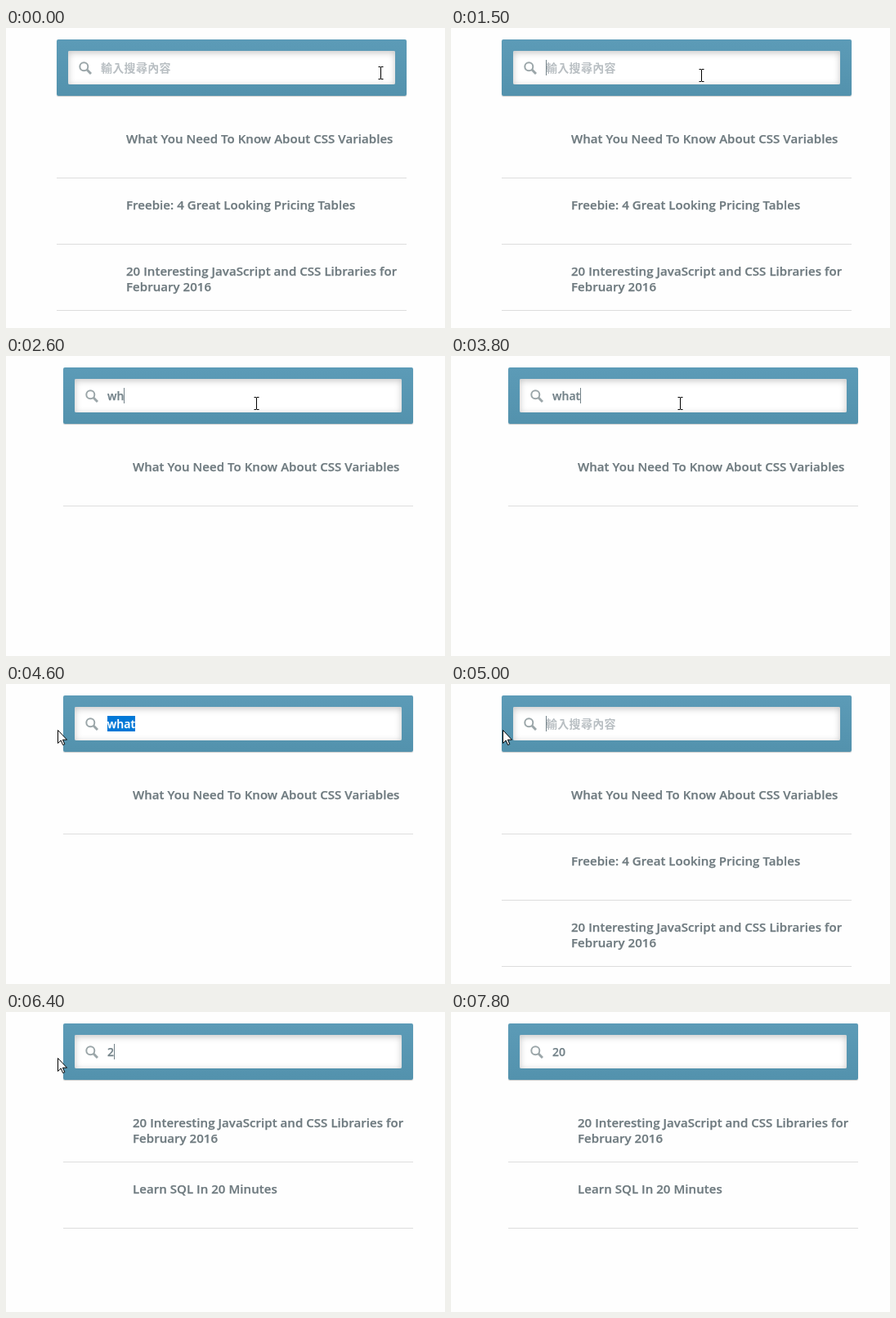
An HTML page that plays this animation: 537 by 367 pixels, repeating every 8.2 s.

```html
<!DOCTYPE html>
<html lang="zh-Hant">
<head>
<meta charset="utf-8">
<title>Instant search</title>
<style>
html, body { margin: 0; width: 100%; height: 100%; overflow: hidden; background: #fefefe; }
body {
  position: relative; font: 600 15px/19px 'Open Sans', sans-serif;
  letter-spacing: .06px; -webkit-text-stroke: .25px;
}
#page { position: absolute; top: 14px; width: 428px; }
.bar {
  height: 41px; padding: 14px; border-radius: 2px;
  background: linear-gradient(#5c9bb7, #5392ad); box-shadow: 0 1px 1px #ccc;
}
.field {
  position: relative; height: 41px; border-radius: 2px; background: #fff;
  box-shadow: 0 2px 8px #c4c4c4 inset; font-size: 14px; color: #738289;
}
.field > * { position: absolute; top: 11px; left: 40px; height: 19px; white-space: pre; }
.field .icon { left: 13px; top: 13px; width: 16px; height: 16px; }
#hint {
  font-family: 'Noto Sans CJK TC', 'Noto Sans CJK', sans-serif; font-weight: 700;
  letter-spacing: .3px; color: #b9bfc3; -webkit-text-stroke: 0;
}
#caret { width: 1px; background: #738289; }
#mark { overflow: hidden; background: #0078d7; color: #fff; }
#mark span { position: absolute; right: 0; }
ul { list-style: none; margin: 20px 0 0; padding: 0; }
li { height: 80px; border-bottom: 1px solid #ddd; }
li p { margin: 0; padding: 23px 0 0 85px; white-space: pre; color: #6e7a7f; }
.cursor { position: absolute; left: 0; top: 0; overflow: visible; width: 1px; height: 1px; }
</style>
</head>
<body>
<div id="page">
  <div class="bar"><div class="field">
    <svg class="icon" viewBox="0 0 16 16" fill="none" stroke="#9ba6a9">
      <circle cx="6.3" cy="6.3" r="5" stroke-width="2"/>
      <path d="M10 10l5 5" stroke-width="3"/>
    </svg>
    <span id="hint">輸入搜尋內容</span>
    <span id="query"></span>
    <span id="mark"><span></span></span>
    <span id="caret"></span>
  </div></div>
  <ul id="list"></ul>
</div>
<svg id="beam" class="cursor" fill="none">
  <path d="M-2.5 -7.5h2.5l.5 .5 .5 -.5h2.5M.5 -7v14M-2.5 7.5h2.5l.5 -.5 .5 .5h2.5" stroke="#000"/>
</svg>
<svg id="arrow" class="cursor">
  <path d="M.5 .5v16l3.7 -3.5 2.4 5.6 2.2 -1 -2.4 -5.4h5.1z" fill="#fff" stroke="#000"/>
</svg>
<script>
const LOOP = 8200, STEP = 100, BLINK = 500;
const titles = [
  'What You Need To Know About CSS Variables',
  'Freebie: 4 Great Looking Pricing Tables',
  '20 Interesting JavaScript and CSS Libraries for\nFebruary 2016',
  'Quick Tip: The Easiest Way To Make\nResponsive Headers',
  'Learn SQL In 20 Minutes',
  'Creating Your First Desktop App With HTML,\nJS and Electron'
];

// Story beats in ms
const FOCUS = 600, DRAG = 4300, CLEAR = 5000, LEAVE = 7800;
const searches = [
  { word: 'what', keys: [1800, 2600, 2700, 3300], end: CLEAR },
  { word: '20', keys: [6400, 6600], end: LOOP }
];
const blinkStarts = [500, 4900, 6400];
const path = [
  { t: 0, x: 458, y: 55 }, { t: 300, x: 306, y: 58 },
  { t: 3700, x: 306, y: 58 }, { t: 4100, x: 200, y: 56 },
  { t: 4200, x: 200, y: 56 }, { t: 4600, x: 63, y: 56 },
  { t: 7100, x: 63, y: 56 }, { t: LEAVE, x: 600, y: 40 }
];

const $ = id => document.getElementById(id);
const show = (el, on) => el.style.visibility = on ? 'visible' : 'hidden';
let shown = null;

function typedAt(t) {
  const { word, keys } = searches.find(search => t < search.end);
  return word.slice(0, keys.filter(key => key <= t).length);
}

function mouseAt(t) {
  const next = path.findIndex(p => p.t > t);
  if (next < 0) return path.at(-1);
  const a = path[next - 1], b = path[next];
  const k = (t - a.t) / (b.t - a.t);
  return { x: Math.round(a.x + (b.x - a.x) * k), y: Math.round(a.y + (b.y - a.y) * k) };
}

function caretAt(t) {
  const start = blinkStarts.findLast(s => s <= t);
  return t >= FOCUS && t < LEAVE && Math.floor((t - start) / BLINK) % 2 === 0;
}

function search(text) {
  if (text === shown) return;
  shown = text;
  $('query').textContent = $('mark').firstChild.textContent = text;
  $('caret').style.left = 40 + Math.round($('query').offsetWidth) + 'px';
  show($('hint'), !text);
  // Short result lists drop the scrollbar, which recentres the page
  $('page').style.left = (text ? 70 : 62) + 'px';
  $('list').replaceChildren(...titles
    .filter(title => title.toLowerCase().includes(text))
    .slice(0, 3)
    .map(title => {
      const item = document.createElement('li');
      item.appendChild(document.createElement('p')).textContent = title;
      return item;
    }));
}

// Selects from the mouse to the end of the query
function select(x) {
  const width = $('query').offsetWidth;
  const from = Math.min(width, Math.max(0, x - 124));
  $('mark').style.left = 40 + from + 'px';
  $('mark').style.width = width - from + 'px';
}

function point({ x, y }) {
  const left = shown ? 84 : 76;
  const inField = x > left && x < left + 400;
  for (const id of ['beam', 'arrow']) {
    $(id).style.transform = `translate(${x}px, ${y}px)`;
    show($(id), (id === 'beam') === inField);
  }
}

function draw(now) {
  const t = Math.floor(now % LOOP / STEP) * STEP;
  const mouse = mouseAt(t);
  const dragging = t >= DRAG && t < CLEAR;
  search(typedAt(t));
  select(mouse.x);
  show($('mark'), dragging);
  show($('caret'), caretAt(t) && !dragging);
  point(mouse);
  requestAnimationFrame(draw);
}

draw(0);
</script>
</body>
</html>
```
